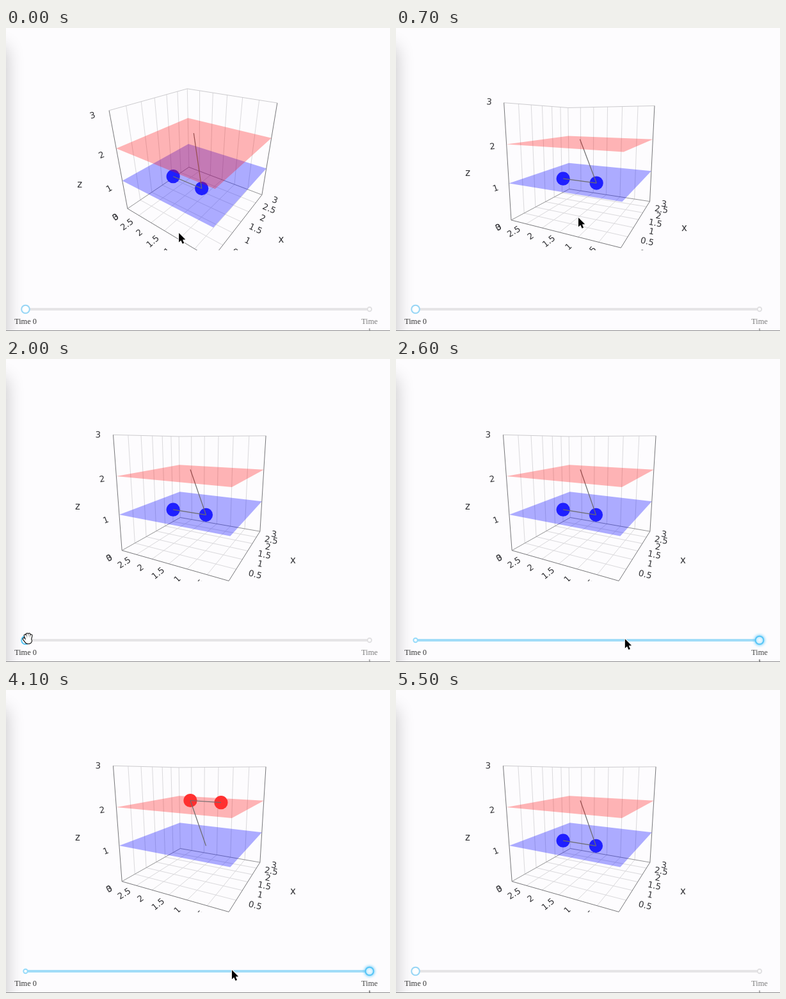
An HTML page with a canvas that plays this animation: 600 px wide and 473 px high, repeating every 5.6 s.

```html
<!DOCTYPE html>
<html lang="en">
<head>
<meta charset="utf-8">
<title>Time slider over a 3D plot</title>
<style>
  html, body { margin: 0; width: 100%; height: 100%; overflow: hidden; background: #fdfcfe; }
  canvas { display: block; }
</style>
</head>
<body>
<canvas id="stage" width="600" height="473"></canvas>
<script>
const ctx = document.getElementById('stage').getContext('2d');
const LOOP = 5600, STEP = 100, RAD = Math.PI / 180;
const SLIDER = { left: 30.5, right: 568, y: 439 };
const NODES = { blue: [[1, 2, 1], [1, 1, 1]], red: [[2, 2, 2], [2, 1, 2]] };
const LABEL_GAP = 0.435, TITLE_GAP = 1.12;
const AXIS = '#77777a', GRID = '#dad9dc', INK = '#333337';

const ramp = (t, from, to) => Math.min(1, Math.max(0, (t - from) / (to - from)));
const glide = (t, from, to) => {
  const p = ramp(t, from, to);
  return p * p * (3 - 2 * p);
};

// A drag that slows down, then settles back a little.
function cameraAt(t) {
  const rest = 1 - ramp(t, 0, 700), settle = ramp(t, 700, 1200);
  return {
    azimuth: 206 + 9.9 * rest ** 4 + settle,
    elevation: 10.1 + 18.6 * rest ** 1.18 + 2.2 * settle
  };
}

// The pointer turns the plot, drags the slider right, drags it back and leaves.
function pointerAt(t) {
  const { azimuth, elevation } = cameraAt(t);
  const dragX = 285 - 1.5 * (azimuth - 206), dragY = 296 + 1.29 * (elevation - 10.1);
  const toSlider = glide(t, 1300, 1900);
  const along = glide(t, 2200, 2900) - glide(t, 3800, 4490);
  const away = glide(t, 3000, 3100) - glide(t, 3400, 3700);
  return {
    x: dragX + (34 - dragX) * toSlider + 534 * along - 15 * away,
    y: dragY + (437 - dragY) * toSlider - 23 * away + 60 * ramp(t, 4600, 4800)
  };
}

function makeProjector({ azimuth, elevation }) {
  const ca = Math.cos(azimuth * RAD), sa = Math.sin(azimuth * RAD);
  const ce = Math.cos(elevation * RAD), se = Math.sin(elevation * RAD);
  return point => {
    const [x, y, z] = point.map(v => v / 3 - 0.5);
    const toward = x * ca + y * sa;
    const scale = 360 / (2.158 - ce * toward - se * z);
    return [299.2 + scale * (y * ca - x * sa), 204.9 - scale * (ce * z - se * toward)];
  };
}

function tracePath(points) {
  ctx.beginPath();
  points.forEach(p => ctx.lineTo(...p));
}

function line(points, color, width = 1) {
  tracePath(points);
  ctx.strokeStyle = color;
  ctx.lineWidth = width;
  ctx.stroke();
}

function disc(x, y, r, fill, border) {
  ctx.beginPath();
  ctx.arc(x, y, r, 0, 7);
  ctx.fillStyle = fill;
  ctx.fill();
  if (border) {
    ctx.strokeStyle = border;
    ctx.lineWidth = 2;
    ctx.stroke();
  }
}

function text(str, x, y, font, color, angle = 0, drop = 0) {
  ctx.save();
  ctx.translate(x, y);
  ctx.rotate(angle);
  ctx.font = font;
  ctx.fillStyle = color;
  ctx.textAlign = 'center';
  ctx.fillText(str, 0, drop);
  ctx.restore();
}

function drawGrid(project) {
  const path = (points, color) => line(points.map(project), color);
  for (let v = 0.5; v < 3; v += 0.5) {
    path([[v, 0, 0], [v, 3, 0], [v, 3, 3]], GRID);
    path([[0, v, 0], [3, v, 0], [3, v, 3]], GRID);
  }
  path([[3, 3, 0], [3, 3, 3]], GRID);
  path([[0, 3, 3], [3, 3, 3], [3, 0, 3]], '#cccbce');
  path([[0, 3, 0], [3, 3, 0], [3, 0, 0]], '#939395');
  path([[0, 3, 3], [0, 3, 0], [0, 0, 0], [3, 0, 0], [3, 0, 3]], AXIS);
}

function drawLabels(project) {
  // Each label lies along the direction that leads away from its axis.
  const tick = (value, at, outer, flip) => {
    const a = project(at), b = project(outer);
    const angle = Math.atan2(flip * (b[1] - a[1]), flip * (b[0] - a[0]));
    text(value, ...b, '13.3px "DejaVu Sans", sans-serif', INK, angle, 4.8);
  };
  for (let v = 0; v <= 3; v += 0.5) {
    tick(v, [v, 0, 0], [v, -LABEL_GAP, 0], 1);
    tick(v, [0, v, 0], [-LABEL_GAP, v, 0], -1);
    if (v % 1 === 0) tick(v, [0, 3, v], [-LABEL_GAP, 3, v], -1);
  }
  const title = (name, at) =>
    text(name, ...project(at), '15px "DejaVu Sans", sans-serif', INK, 0, 4);
  title('x', [1.5, -TITLE_GAP, 0]);
  title('y', [-TITLE_GAP, 1.5, 0]);
  title('z', [-TITLE_GAP, 3, 1.5]);
}

function drawPlane(project, z, color) {
  tracePath([[0, 0, z], [3, 0, z], [3, 3, z], [0, 3, z]].map(project));
  ctx.fillStyle = color;
  ctx.fill();
}

function drawScene(t) {
  const project = makeProjector(cameraAt(t));
  const later = t >= 3100 && t < 4600;
  const nodes = later ? NODES.red : NODES.blue;
  const drawNodes = () => {
    nodes.forEach(n => disc(...project(n), 10.6, later ? '#ff3030' : '#1f1fff'));
    line(nodes.map(project), '#6c6c6c', 1.2);
    line([NODES.blue[1], NODES.red[0]].map(project), '#6c6c6c', 1.2);
  };

  ctx.save();
  ctx.beginPath();
  ctx.rect(0, 0, 600, 347);
  ctx.clip();
  drawGrid(project);
  drawPlane(project, 1, 'rgba(0,0,255,.32)');
  if (!later) drawNodes();
  drawPlane(project, 2, 'rgba(255,0,0,.29)');
  if (later) drawNodes();
  drawLabels(project);
  ctx.restore();
}

function drawSlider(t, on) {
  const { left, right, y } = SLIDER;
  const held = (t >= 2100 && t <= 3000) || (t >= 3700 && t < 4600);
  const hover = t >= 1900 && t < 2100;

  line([[left, y], [right, y]], on ? '#a0dcf8' : '#e5e4e6', 4);
  disc(left, y, 3.2, '#fff', '#96dbfa');
  disc(right, y, 3.2, '#fff', on ? '#96dbfa' : '#e1e0e2');

  ctx.save();
  if (held) {
    ctx.shadowColor = '#57c5f7';
    ctx.shadowBlur = 5;
  }
  disc(on ? right : left, y, 6.3, '#fff', held || hover ? '#57c5f7' : '#96d5f5');
  ctx.restore();

  const font = '12.3px "Liberation Serif", serif';
  const color = on ? '#444' : '#7c7c7c';
  text('Time 0', left, 462, font, '#333');
  text('Time', right, 462, font, color);
  text('1', right, 476.5, font, color);
}

function drawArrow() {
  ctx.scale(0.93, 0.93);
  tracePath([[0, 0], [0, 15.5], [3.5, 12.3], [6, 18], [8.7, 16.9], [6.3, 11.3], [11, 11]]);
  ctx.closePath();
  ctx.lineJoin = 'round';
  ctx.strokeStyle = '#fff';
  ctx.lineWidth = 2;
  ctx.stroke();
  ctx.fillStyle = '#000';
  ctx.fill();
}

function drawHand() {
  ctx.lineCap = 'round';
  for (const [color, width, grow] of [['#000', 4.6, 1], ['#fff', 2.5, 0]]) {
    ctx.beginPath();
    ctx.ellipse(1, 3, 5 + grow, 4.2 + grow, 0, 0, 7);
    ctx.fillStyle = color;
    ctx.fill();
    for (let i = -1.5; i < 2; i++) {
      line([[0.6 + 3.1 * i, i * i - 7.5], [1 + 2 * i, 0]], color, width);
    }
    line([[-6, 0], [-2, 5]], color, width);
  }
}

function drawPointer(t, { x, y }, handleX) {
  if (t >= 4800) return;
  ctx.save();
  ctx.translate(x, y);
  if (Math.hypot(x - handleX, y - SLIDER.y) < 8) drawHand();
  else drawArrow();
  ctx.restore();
}

function drawPage() {
  ctx.fillStyle = '#fdfcfe';
  ctx.fillRect(0, 0, 600, 473);
  ctx.save();
  ctx.shadowColor = 'rgba(0,0,0,.24)';
  ctx.shadowBlur = 28;
  ctx.fillStyle = '#fff';
  ctx.fillRect(-60, 30, 60, 500);
  ctx.restore();
  line([[0, 472.5], [600, 472.5]], '#8c8c8e');
}

function render(now) {
  const t = Math.floor((now % LOOP) / STEP) * STEP;
  const pointer = pointerAt(t);
  const on = pointer.x > (SLIDER.left + SLIDER.right) / 2;
  drawPage();
  drawScene(t);
  drawSlider(t, on);
  drawPointer(t, pointer, on ? SLIDER.right : SLIDER.left);
}

const start = performance.now();
function tick() {
  render(performance.now() - start);
  requestAnimationFrame(tick);
}
tick();
</script>
</body>
</html>
```
